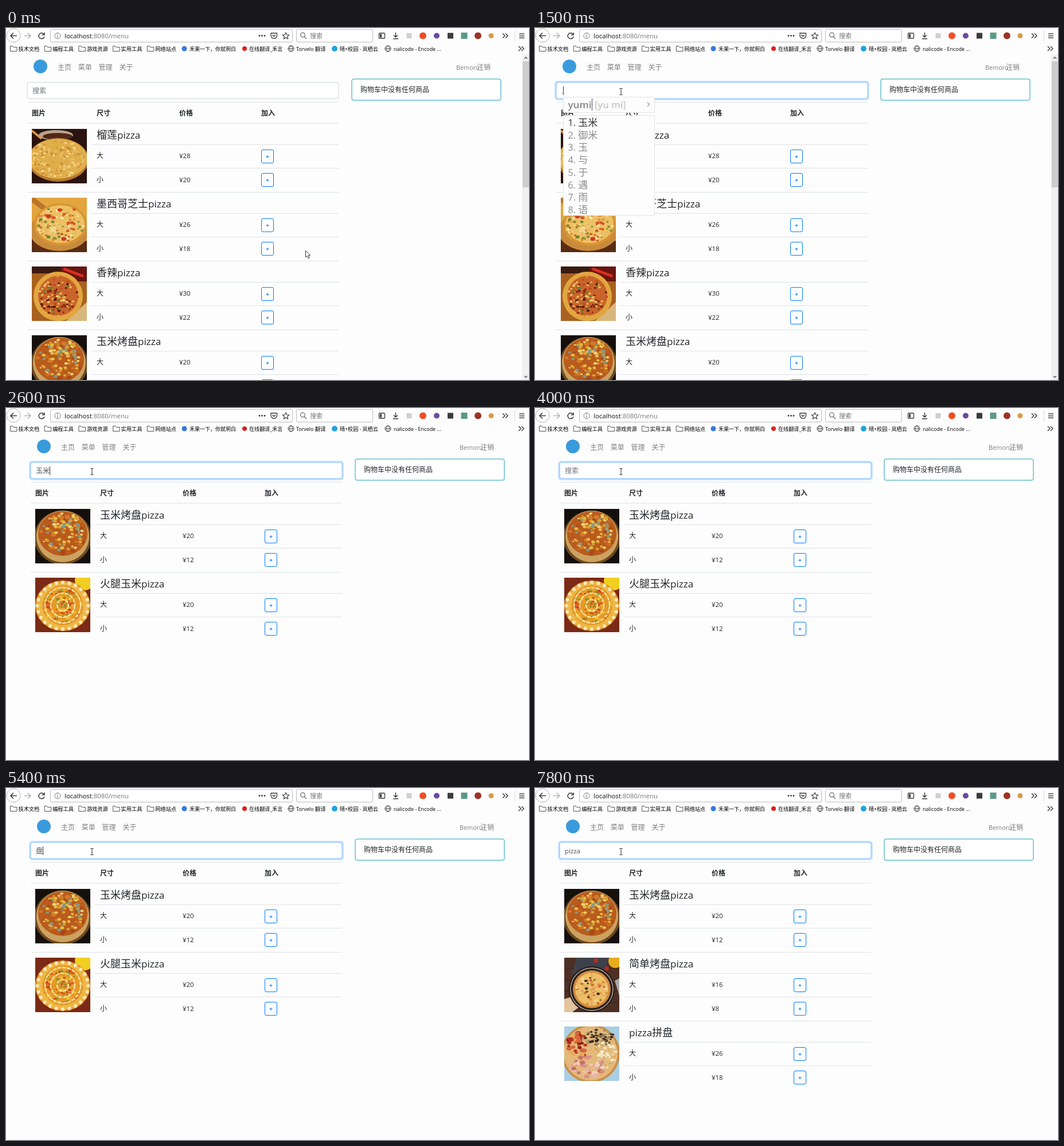
Write an HTML page that moves like this. It is 912x614 px and loops after 8000 ms.

```html
<!DOCTYPE html>
<html lang="zh-CN">
<head>
<meta charset="utf-8">
<title>菜单</title>
<style>
html, body { margin: 0; width: 100%; height: 100%; overflow: hidden; background: #fdfdfd; }
svg { display: block; }
text { font-family: "Open Sans", "Noto Sans CJK SC", "Noto Sans CJK", sans-serif; white-space: pre; }
</style>
</head>
<body>
<svg id="stage" width="912" height="614" viewBox="0 0 912 614">
  <defs id="defs"></defs>
  <g id="page"></g>
  <g id="chrome"></g>
  <g id="pointer"></g>
</svg>
<script>
const $ = id => document.getElementById(id);
const INK = '#212529', GREY = '#6c757d', LINE = '#dee2e6', BLUE = '#007bff';

// ---- drawing helpers ----
const rect = (x, y, w, h, fill, more = '') =>
  `<rect x="${x}" y="${y}" width="${w}" height="${h}" fill="${fill}" ${more}/>`;
const oval = (cx, cy, rx, ry, fill, more = '') =>
  `<ellipse cx="${cx}" cy="${cy}" rx="${rx}" ry="${ry}" fill="${fill}" ${more}/>`;
const disc = (cx, cy, r, fill, more) => oval(cx, cy, r, r, fill, more);
const path = (d, stroke, w = 1, fill = 'none') =>
  `<path d="${d}" stroke="${stroke}" stroke-width="${w}" fill="${fill}"/>`;
const hline = (x1, x2, y, color = LINE) => rect(x1, y, x2 - x1, 1, color);

// Latin runs are set slightly smaller than the Chinese glyphs.
function txt(x, y, s, size = 12, fill = INK, more = '') {
  const body = s.replace(/[\x20-\x7e¥]+/g, m => `<tspan font-size="${size * .95}">${m}</tspan>`);
  return `<text x="${x}" y="${y}" font-size="${size}" fill="${fill}" ${more}>${body}</text>`;
}

function random(seed) {
  return () => (seed = (seed * 16807) % 2147483647) / 2147483647;
}

function crumbs(n, seed, cx, cy, rx, ry, size, colors) {
  const rnd = random(seed * 7919);
  let out = '';
  for (let i = 0; i < n; i++) {
    const a = rnd() * Math.PI * 2, d = Math.sqrt(rnd()), r = size * (.6 + rnd() * .7);
    out += oval((cx + rx * d * Math.cos(a)).toFixed(1), (cy + ry * d * Math.sin(a)).toFixed(1),
      r.toFixed(1), (r * .75).toFixed(1), colors[i % colors.length]);
  }
  return out;
}

function ring(n, r, size, color) {
  let out = '';
  for (let i = 0; i < n; i++) {
    const a = i / n * Math.PI * 2;
    out += disc((48 + r * Math.cos(a)).toFixed(1), (49 + r * .92 * Math.sin(a)).toFixed(1), size, color);
  }
  return out;
}

// ---- dishes, each on a 96 x 95 tile ----
const art = {
  durian: () => rect(0, 0, 96, 95, '#2b1310') + oval(42, 11, 30, 9, '#b9a58c') + oval(45, 13, 26, 6, '#50281a') +
    path('M0 3L17 17', '#d89a4c', 4) + oval(46, 54, 53, 38, '#b8792c') + oval(46, 52, 51, 35, '#dfae4b') +
    crumbs(170, 3, 46, 52, 49, 33, 2.1, ['#efce7c', '#d19a38', '#e8bd5c', '#c4842f', '#f2d88e']),
  mexican: () => rect(0, 0, 96, 95, '#e2a53f') + path('M-2 70Q30 98 98 74V96H-2Z', 'none', 0, '#5a2c12') +
    oval(48, 58, 52, 35, '#c88a3c') + path('M0 2L26 22', '#b9752c', 9) + oval(50, 47, 46, 37, '#d89432') +
    oval(50, 46, 42, 33, '#ecc062') +
    crumbs(120, 8, 50, 46, 41, 32, 2.4, ['#f5dc9a', '#dd8a34', '#f0c871', '#cf5a26', '#f7e4b4', '#8a8a35']) +
    crumbs(11, 12, 50, 46, 36, 28, 3.8, ['#cf3a20', '#d9562c', '#6f8436']),
  spicy: () => rect(0, 0, 96, 95, '#a9611f') + rect(48, 0, 48, 26, '#6b1410') + rect(0, 0, 50, 12, '#3a1a10') +
    path('M60 95L96 62V95Z', 'none', 0, '#d9b77c') + path('M55 4L90 17', '#d92f22', 5) +
    disc(46, 52, 43, '#e2a640') + disc(46, 51, 35, '#c9642a') +
    crumbs(125, 21, 46, 51, 34, 34, 2.3, ['#8c2916', '#e8b350', '#c04a20', '#5a2014', '#efc66c', '#77772d']),
  corn: () => rect(0, 0, 96, 95, '#16100d') + oval(48, 50, 50, 47, '#6e4a20') + oval(48, 48, 46, 45, '#cba260') +
    oval(48, 43, 43, 39, '#b95b1d') + crumbs(45, 5, 48, 43, 40, 36, 4, ['#c96b22', '#a94a18', '#d27a2b']) +
    crumbs(88, 33, 48, 40, 40, 33, 2.8, ['#e6bd43', '#d9a331', '#ecd070', '#82998a']),
  ham: () => rect(0, 0, 96, 95, '#7a2a16') + disc(86, 5, 17, '#f0cf22') + oval(48, 49, 48, 44, '#d98421') +
    ring(24, 41, 6.5, '#eeb748') + ring(24, 44, 2.8, '#faeabf') + disc(48, 48, 35, '#e59a25') +
    crumbs(105, 17, 48, 48, 33, 32, 2.7, ['#f2c22f', '#d9601f', '#f0a838', '#c94a1c', '#94902d']) +
    [31, 21, 10].map(r => disc(48, 48, r, 'none', 'stroke="#f8e7a8" stroke-width="2.2" stroke-dasharray="7 1.5"')).join(''),
  simple: () => rect(0, 0, 96, 95, '#4d2f24') + [18, 38, 58, 78].map(y => hline(0, 96, y, '#3b221a')).join('') +
    path('M22 0H80L70 22L44 14L12 30Z', 'none', 0, '#3c414b') + disc(89, 6, 12, '#e9ac1d') + disc(55, 5, 4, '#b62c20') +
    disc(74, 19, 4, '#a92a1e') + path('M0 72L22 66L34 80L14 95H0Z', 'none', 0, '#e3c39d') +
    path('M88 40L96 36V66Z', 'none', 0, '#a9a9a8') + disc(48, 55, 40, '#241c1a') +
    disc(48, 55, 37, 'none', 'stroke="#b9a99a" stroke-width="1.5"') + disc(48, 55, 33, '#d18a3d') + disc(48, 55, 29, '#edbd67') +
    crumbs(55, 41, 48, 55, 27, 27, 2.3, ['#f4d592', '#dd8f40', '#efc577', '#c9662c']) +
    crumbs(8, 50, 48, 55, 22, 22, 2.3, ['#3a2a1c']) + path('M48 26V84M22 42L74 68M22 68L74 42', '#c98a42', .8),
  platter: () => rect(0, 0, 96, 95, '#a9cfe4') + disc(46, 47, 51, '#c98f4a') + disc(46, 47, 47, '#e3b878') +
    crumbs(34, 61, 24, 32, 19, 22, 4.3, ['#b5301f', '#d5673a', '#e6a95c', '#8e2418']) +
    crumbs(75, 67, 60, 19, 27, 14, 2.4, ['#4c3a26', '#8d7a55', '#2f281d', '#b09a6c']) +
    crumbs(60, 71, 72, 49, 18, 24, 2.8, ['#f1dfb4', '#e2bf82', '#f6ecd0', '#d9a860']) +
    crumbs(55, 77, 41, 71, 31, 20, 4, ['#d98f86', '#e9b5a6', '#c77068', '#f0cdb8'])
};

const dishes = {
  durian: ['榴莲pizza', 28, 20], mexican: ['墨西哥芝士pizza', 26, 18], spicy: ['香辣pizza', 30, 22],
  corn: ['玉米烤盘pizza', 20, 12], ham: ['火腿玉米pizza', 20, 12],
  simple: ['简单烤盘pizza', 16, 8], platter: ['pizza拼盘', 26, 18]
};

// ---- browser frame ----
function chrome() {
  const dark = '#3a3a3c', mid = '#737373';
  const folder = x => path(`M${x} 31.5h4l1.5 2h6v7h-11.5z`, '#555', 1);
  const globe = x => disc(x, 36, 5, 'none', 'stroke="#333"') + oval(x, 36, 2.2, 5, 'none', 'stroke="#333" stroke-width=".8"') +
    path(`M${x - 5} 36h10`, '#333', .8);
  const more = (x, y) => path(`M${x - 4} ${y - 4}l4 4l-4 4m5-8l4 4l-4 4`, dark, 1.4);
  const lens = path('M520 15l4 4', mid, 1.5) + disc(517.5, 12, 3.8, 'none', `stroke="${mid}" stroke-width="1.3"`);
  const box = (x, w) => rect(x, 2.5, w, 22, '#fff', 'stroke="#bdbdbd" rx="2"');
  const mark = (x, s, color) => rect(x - s / 2, 13.5 - s / 2, s, s, color);

  let out = rect(0, 0, 912, 46, '#fdfdfd') +
    disc(13, 13, 12, '#fff', 'stroke="#b4b4b4"') + path('M19 13.5H8m5-5l-5 5l5 5', dark, 1.6) +
    path('M32 13.5h11m-5-5l5 5l-5 5', '#b5b5b5', 1.5) +
    path('M66 10.5A5 5 0 1 0 67 15M67 8v4h-4', dark, 1.5) + box(77.5, 422) +
    disc(90, 13.5, 5, 'none', `stroke="${mid}"`) + path('M90 12.5v4M90 10v1.3', mid, 1.2) +
    txt(102, 17.5, 'localhost<tspan fill="#777">:8080/menu</tspan>'.replace(/^localhost/, 'localhost'), 12, '#111') +
    [442, 446.5, 451].map(x => disc(x, 13.5, 1.4, dark)).join('') +
    path('M462 9h10.5v4a5.2 5.2 0 0 1-10.5 0zM464.5 12l2.7 2.5l2.7-2.5', dark, 1.3) +
    path('M488 8l1.7 3.7l4 .4l-3 2.7l.9 4l-3.6-2.1l-3.6 2.1l.9-4l-3-2.7l4-.4z', dark, 1.1) +
    box(506.5, 133) + lens + txt(530, 18, '搜索', 11, mid) +
    rect(650.5, 9, 10, 9, 'none', `stroke="${dark}" stroke-width="1.3" rx="1"`) + rect(652, 10.5, 3, 6, dark) +
    path('M679.500 8v8m-3.500-3.500l3.500 3.500l3.500-3.500M675 18.700h9', dark, 1.4) +
    mark(703, 9, '#cfcfcf') + disc(727, 13.5, 6, '#f04e23') + disc(751, 13.5, 5, '#6c4aa0') +
    mark(775, 10, '#3c3c3e') + mark(799, 11, '#5b9a86') + disc(823, 13.5, 6, '#9c3327') + disc(846, 13.5, 4.5, '#d99a4a') +
    more(870, 13.5) + rect(887, 4, 1, 20, '#dcdcdc') +
    [9.5, 13, 16.5].map(y => rect(895, y, 9, 1.4, dark)).join('') + more(898, 36);

  ['技术文档', '编程工具', '游戏资源', '实用工具', '网络站点'].forEach((s, i) => {
    const x = 7.5 + i * 59.7;
    out += folder(x) + txt(x + 14, 39.5, s, 9.2, '#000');
  });
  return out + disc(311, 36, 4.5, '#3478e0') + txt(320, 39.5, '禾果一下，你就明白', 9, '#000') +
    disc(416, 36, 4, '#e02020') + txt(424, 39.5, '在线翻译_禾言', 9.1, '#000') +
    globe(497) + txt(506, 39.5, 'Torvelo 翻译', 9.4, '#000') +
    disc(573, 36, 5, '#22a3e0') + txt(582, 39.5, '晴+校园 - 岚栖云', 9.1, '#000') +
    globe(666) + txt(676, 39.5, 'nalicode - Encode ...', 9.4, '#000');
}

// ---- page parts ----
function addButton(y) {
  return rect(445.5, y + .5, 21, 23, '#fdfdfd', `stroke="${BLUE}" rx="2.5"`) +
    path(`M453.500 ${y + 12.5}h5M456 ${y + 10}v5`, BLUE, 1);
}

function dishRow(key, i, last, picture = key) {
  const y = 166 + i * 120, [name, ...prices] = dishes[key];
  let out = `<use href="#${picture}" x="45" y="${y + 10}" width="96" height="95"/>` + txt(158, y + 26.5, name, 18);
  prices.forEach((price, k) => {
    const top = y + 37 + k * 41.5;
    out += hline(149, 580, Math.floor(top)) + txt(158, top + 24, k ? '小' : '大') +
      txt(302, top + 24, '¥' + price) + addButton(Math.floor(top) + 9);
  });
  return out + (last ? '' : hline(37, 580, y + 120));
}

function searchBox(s) {
  const ring = s.glow ? rect(35.5, 93.5, 546, 31, 'none', `stroke="#bfdeff" stroke-width="2.6" rx="4" opacity="${s.glow}"`) : '';
  const empty = !s.text && !s.ime;
  return ring + rect(37, 95, 543, 28, '#fff', `stroke="${s.glow ? '#80bdff' : '#ced4da'}" rx="3"`) +
    (empty ? txt(46, 114, '搜索', 12, GREY) : txt(46, 114, s.text, 12, '#495057', 'id="typed"')) +
    (s.ime ? rect(47, 113, 1, 1, '#555') : '') +
    (s.caret ? rect(46, 102, 1, 15, '#333', 'id="caret"') : '');
}

function imePopup({ keys, hint, words }) {
  const panel = (y, h) => rect(49.5, y, 159, h, '#fdfdfd', 'stroke="#e2e2e2" rx="1.5"');
  return panel(120.5, 27) + panel(152.5, words.length * 21.7 + 1) +
    `<text id="keys" x="57.5" y="140" font-size="17" font-weight="600" fill="#888">${keys}</text>` +
    rect(74, 123, 1.2, 21, '#5a6b85', 'id="keyCaret"') +
    `<text id="hint" x="79" y="140" font-size="16.500" font-weight="600" fill="#c8c8c8">[${hint}]</text>` +
    path('M196 129.500l3.500 3.500l-3.500 3.500', '#999', 1.2) +
    words.map((w, i) => txt(57.5, 171 + i * 21.7, `${i + 1}. ${w}`, 17, i ? '#8c8c8c' : '#333')).join('');
}

function scrollbar() {
  return rect(900, 46, 12, 568, '#f0f0f0') + rect(901, 58, 11, 220, '#cdcdcd') +
    path('M904 53.500l2.500-2.500l2.500 2.500', '#505050', 1.3) + path('M904 607l2.500 2.500l2.500-2.500', '#505050', 1.3);
}

function page(s) {
  const nav = ['主页', '菜单', '管理', '关于'].map((w, i) => txt(90 + i * 35.8, 72.5, w, 12, '#7f7f7f')).join('');
  const head = ['图片', '尺寸', '价格', '加入'].map((w, i) =>
    txt([45, 158, 302, 445][i], 153, w, 12, INK, 'font-weight="700"')).join('');
  const rows = s.list.map((key, i) =>
    dishRow(key, i, i === s.list.length - 1, s.stale && i === 1 ? 'ham' : key)).join('');
  return `<g transform="translate(${s.dx} 0)">` + disc(60, 67, 12, '#3a9bdc') + nav +
    txt(785, 72.5, 'Bemoru', 11.4, '#7f7f7f') + txt(821, 72.5, '注销', 12, '#7f7f7f') + searchBox(s) +
    rect(603, 89, 260, 37, '#fff', 'stroke="#17a2b8" rx="3"') + txt(618, 112, '购物车中没有任何商品') +
    hline(37, 580, 129) + head + hline(37, 580, 165.5) + rows + (s.ime ? imePopup(s.ime) : '') + '</g>' +
    (s.dx ? '' : scrollbar());
}

// ---- timeline ----
const ime = (keys, hint, words) => ({ keys, hint, words: [...words.split(' ')] });
const steps = [
  [0, { list: ['durian', 'mexican', 'spicy', 'corn'], dx: 0, glow: 0, text: '', caret: 0, ime: null, stale: 0 }],
  [600, { glow: .5, caret: 1 }],
  [700, { glow: 1 }],
  [1100, { caret: 0 }],
  [1200, { ime: ime('yu', 'yu', '与 于 玉 遇 雨 鱼 欲 语') }],
  [1500, { ime: ime('yumi', 'yu mi', '玉米 御米 玉 与 于 遇 雨 语'), caret: 1 }],
  [1700, { ime: null, text: '玉米' }],
  [2000, { caret: 0 }],
  [2500, { caret: 1 }],
  [2600, { list: ['corn', 'ham'], dx: 6 }],
  [3000, { caret: 0 }],
  [3400, { text: '玉', caret: 1 }],
  [3500, { text: '' }],
  [4000, { caret: 0 }],
  [4200, { ime: ime('p', 'p', '平 片 怕 跑 旁 票 盘'), caret: 1 }],
  [4400, { ime: ime('pj', 'pan', '盘 潘 盼 判 攀 胖 叛'), caret: 0 }],
  [4800, { ime: null, text: '盘', caret: 1 }],
  [4900, { caret: 0 }],
  [5400, { caret: 1 }],
  [5700, { list: ['corn', 'simple', 'platter'], stale: 1 }],
  [5900, { stale: 0, caret: 0 }],
  [6400, { caret: 1 }],
  [6500, { text: '' }],
  [6900, { caret: 0 }],
  [7000, { text: 'p', caret: 1 }],
  [7100, { text: 'pi' }],
  [7300, { text: 'piz' }],
  [7400, { text: 'pizz' }],
  [7500, { text: 'pizza' }],
  [7800, { caret: 0 }]
];

function pointer(t) {
  const k = Math.min(1, Math.floor(t / 100) / 5), e = k * k * (3 - 2 * k);
  const x = Math.round(522 + (150 - 522) * e), y = Math.round(388 + (111 - 388) * e);
  return `<g transform="translate(${x} ${y})">` + (y < 124
    ? path('M-2.500 -5.500h2l.5 .5l.5-.5h2M0 -5v10M-2.500 5.500h2l.5-.5l.5 .5h2', '#222', 1)
    : path('M.5 .5v11.500l2.700-2.500l2 4.300l1.900-.9l-2-4.200h3.600z', '#222', .9, '#fff')) + '</g>';
}

function placeCarets() {
  const typed = $('typed'), caret = $('caret'), keys = $('keys');
  if (typed && caret) caret.setAttribute('x', Math.round(46 + typed.getComputedTextLength()));
  if (keys) {
    const end = 58 + keys.getComputedTextLength();
    $('keyCaret').setAttribute('x', end);
    $('hint').setAttribute('x', end + 5);
    if ($('caret')) $('caret').setAttribute('x', 49);
  }
}

let shown = -1;
function draw(t) {
  const past = steps.filter(([at]) => at <= t);
  if (past.length !== shown) {
    shown = past.length;
    $('page').innerHTML = page(Object.assign({}, ...past.map(p => p[1])));
    placeCarets();
  }
  $('pointer').innerHTML = pointer(t);
}

$('defs').innerHTML = Object.entries(art).map(([id, paint]) =>
  `<symbol id="${id}" viewBox="0 0 96 95">${paint()}</symbol>`).join('');
$('chrome').innerHTML = chrome();
// The path part of the address is grey.
const address = [...document.querySelectorAll('#chrome text')].find(n => n.textContent.includes('8080'));
address.innerHTML = '<tspan font-size="11.400">localhost</tspan><tspan font-size="11.400" fill="#777">:8080/menu</tspan>';

const start = performance.now();
(function loop() {
  draw((performance.now() - start) % 8000);
  requestAnimationFrame(loop);
})();
</script>
</body>
</html>
```
